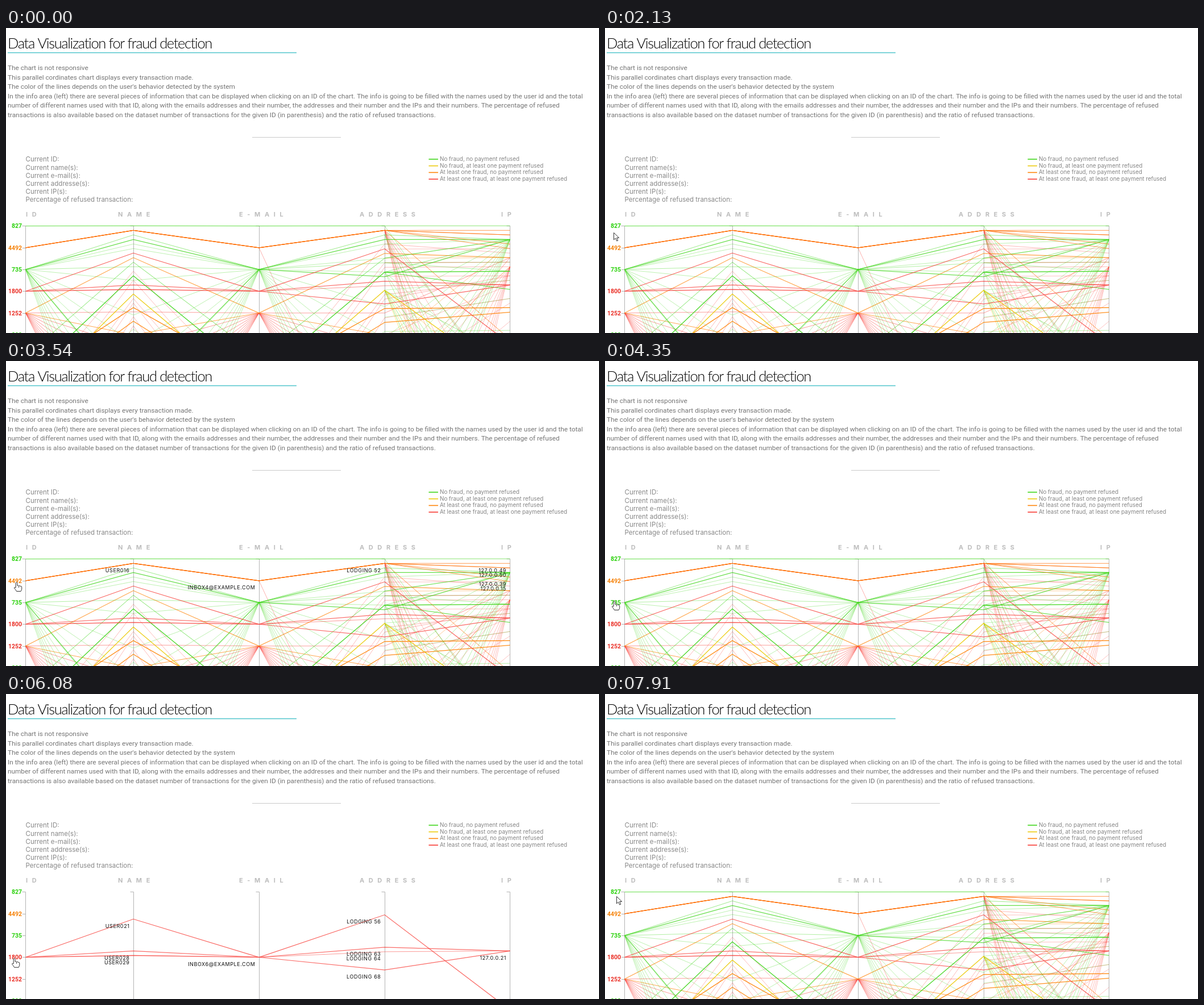
An HTML page with a canvas for the animation above (8000 ms loop, 1043 by 537 pixels).

```html
<!DOCTYPE html>
<html lang="en">
<head>
<meta charset="utf-8">
<title>Data Visualization for fraud detection</title>
<style>
  html, body { margin: 0; width: 100%; height: 100%; overflow: hidden; background: #fff; }
  canvas { display: block; }
</style>
</head>
<body>
<canvas id="stage" width="1043" height="537"></canvas>
<script>
const ctx = document.getElementById('stage').getContext('2d');
const LOOP = 8000;
const AXES = [34.5, 224, 445, 666, 886.5];
const TOP = 348;
const NONE = NaN;
const COLORS = { g: '#40d61c', y: '#eccb0c', o: '#ff8508', r: '#f83a34', d: '#ff6c00' };
const IDS = [['827', 'g'], ['4492', 'o'], ['735', 'g'], ['1800', 'r'], ['1252', 'r'], ['890', 'g']];

const idY = k => TOP + 0.3 + 38.3 * k;
const clamp = v => Math.max(0, Math.min(1, v));
const ramp = (t, a, b) => clamp((t - a) / (b - a));

let seed = 11;
function rand(lo, hi) {
  seed = (seed * 1664525 + 1013904223) % 4294967296;
  return lo + (hi - lo) * seed / 4294967296;
}

// Transactions: one polyline each over the five axes
const lines = [];
function line(id, color, alpha, ys) {
  lines.push({ id, color: COLORS[color], alpha, ys });
}
function path(k, color, alpha, name, address, ip) {
  line(k, color, alpha, [idY(k), name, idY(k), address, ip]);
}
function link(id, color, alpha, address, ip) {
  line(id, color, alpha, [NONE, NONE, NONE, address, ip]);
}
function fan(n, add) {
  for (let i = 0; i < n; i++) add(i);
}

function buildLines() {
  // lower IDs, only partly in view
  const peaks = [[428, 380, 396], [444, 413, 412], [476, 421, 420], [484, 469, 444], [508, 477, 436], [524, 510, 476]];
  peaks.forEach(([name, address, ip], i) => path(8 + i, 'r', 0.34, name, address, ip));
  fan(3, i => link(-1, 'r', 0.3, 389 + 24 * i, 388 + 24 * i));
  fan(3, i => link(-1, 'g', 0.3, 413 + 48 * i, 412 + 32 * i));
  link(-1, 'o', 0.4, 405, 404);
  fan(10, i => link(-1, 'r', 0.32, 356, 640 + 75 * i + rand(0, 40)));
  fan(3, i => link(-1, 'g', 0.32, 364, 640 + 180 * i));
  fan(8, i => link(-1, i % 2 ? 'y' : 'g', 0.45, 461.5, 580 + 65 * i));
  fan(3, i => link(-1, 'g', 0.36, 429.5, 620 + 130 * i));
  fan(9, i => link(-1, 'r', 0.32, 580 + 95 * i + rand(0, 40), 420));
  fan(3, i => link(-1, 'r', 0.3, 540 + 80 * i, 452 + 32 * i));
  fan(2, i => link(-1, 'o', 0.4, 560 + 70 * i, 380 + 40 * i));
  line(-1, 'r', 0.4, [NONE, NONE, idY(1), 865, NONE]);
  path(9, 'g', 0.36, 530, 534, 532);

  // 1252
  path(4, 'r', 0.48, 499.5, 501.5, 404);
  fan(10, i => path(4, 'r', 0.48, 562 + 36 * i, 566 + 38 * i, 700 + 40 * i));
  link(4, 'r', 0.48, 668, 404);
  path(4, 'o', 0.75, 404, 396.5, 404);
  path(4, 'o', 0.7, 540, 541, 560);

  // 735
  fan(10, i => path(2, 'g', 0.34, 505 + 50 * i, 490 + 56 * i, 372));
  path(2, 'g', 0.75, 650, 437.5, 372);
  path(2, 'g', 0.5, 364, 364, 372);
  path(2, 'g', 0.8, 372, 372, 372);
  path(2, 'g', 0.34, 380, 380, 372);
  path(2, 'g', 0.34, 388, 405, 372);
  path(2, 'g', 0.4, 420, 413, 428);
  path(2, 'g', 0.34, 444, 429.5, 460);
  link(2, 'g', 0.7, 429.5, 460);
  link(2, 'g', 0.5, 429.5, 372);

  // heavier traffic of lower IDs
  path(6, 'g', 0.65, 412, 405, 372);
  path(7, 'g', 1, 436, 429.5, 428);
  path(8, 'y', 1, 468, 461.5, 620);
  path(7, 'o', 1, 492, 493.5, 492);
  path(8, 'o', 0.9, 516, 518, 500);

  // 1800
  path(3, 'r', 0.8, 396, 388.5, 556);
  path(3, 'r', 0.75, 452, 445.5, 452);
  path(3, 'r', 0.5, 460, 453.5, 452);
  path(3, 'r', 0.75, 460, 485.5, 452);

  // 4492 and 827
  for (const ip of [356, 364, 364, 380, 388, 548]) path(1, 'd', 0.68, 356, 356, ip);
  path(0, 'g', 0.6, TOP, TOP, TOP);
  path(0, 'g', 0.4, TOP, TOP, 660);
}

// Label of a point on axis 1..4
function caption(axis, y) {
  const i = Math.round((y - TOP) / 8);
  if (axis === 1) return 'USER' + String(15 + i).padStart(3, '0');
  if (axis === 2) return 'INBOX' + (3 + Math.round((y - TOP) / 38.3)) + '@EXAMPLE.COM';
  if (axis === 3) return 'LODGING ' + (51 + i);
  return '127.0.0.' + ([1, 49, 50, 7, 39, 15][i] || 20 + i * 7 % 90);
}

// Pointed-at IDs: index, start, end
const HOVERS = [[0, 2270, 2880], [1, 3520, 4190], [2, 4400, 5280], [3, 5860, 6110], [4, 6330, 6870], [2, 7560, 7640]];

// Pointer tip: time, x, y
const TRACK = [
  [360, 864, 537], [560, 690, 440], [800, 280, 290], [1040, 25, 224], [1110, 36, 217],
  [1180, 36, 217], [1450, 28, 275], [1800, 16, 339], [1900, 16, 339], [2000, 17, 331],
  [2130, 15, 360], [2280, 16, 348], [2480, 17, 346], [2780, 17, 346], [2930, 15, 358],
  [3300, 17, 375], [3540, 18, 389], [3610, 18, 389], [4110, 18, 389], [4350, 16, 422],
  [4610, 16, 423], [5170, 16, 423], [5560, 13, 451], [5860, 14, 460], [6020, 14, 462],
  [6060, 14, 462], [6330, 15, 498], [6550, 15, 501], [6720, 15, 501], [6890, 15, 510],
  [7100, 15, 512], [7310, 15, 512], [7600, 16, 427], [7910, 20, 356]
];

function pointerAt(t) {
  if (t < TRACK[0][0]) return null;
  const n = TRACK.findIndex(p => p[0] > t);
  if (n < 0) return TRACK[TRACK.length - 1].slice(1);
  const [t0, x0, y0] = TRACK[n - 1], [t1, x1, y1] = TRACK[n];
  const u = (t - t0) / (t1 - t0);
  return [x0 + (x1 - x0) * u, y0 + (y1 - y0) * u];
}

function text(str, x, y, font, color, spacing = 0, align = 'left') {
  ctx.font = font;
  ctx.fillStyle = color;
  ctx.letterSpacing = spacing + 'px';
  ctx.textAlign = align;
  ctx.fillText(str, x, y);
}

function stroke(points, color, width = 1) {
  ctx.beginPath();
  for (const [x, y] of points) ctx.lineTo(x, y);
  ctx.strokeStyle = color;
  ctx.lineWidth = width;
  ctx.stroke();
}

const INTRO = [
  'The chart is not responsive',
  'This parallel cordinates chart displays every transaction made.',
  "The color of the lines depends on the user's behavior detected by the system",
  'In the info area (left) there are several pieces of information that can be displayed when clicking on an ID of the chart. The info is going to be filled with the names used by the user id and the total',
  'number of different names used with that ID, along with the emails addresses and their number, the addresses and their number and the IPs and their numbers. The percentage of refused',
  'transactions is also available based on the dataset number of transactions for the given ID (in parenthesis) and the ratio of refused transactions.'
];
const INFO = ['Current ID:', 'Current name(s):', 'Current e-mail(s):', 'Current addresse(s):', 'Current IP(s):', 'Percentage of refused transaction:'];
const LEGEND = [
  ['g', 'No fraud, no payment refused'],
  ['y', 'No fraud, at least one payment refused'],
  ['o', 'At least one fraud, no payment refused'],
  ['r', 'At least one fraud, at least one payment refused']
];
const HEADS = [['ID', 35], ['NAME', 197], ['E-MAIL', 410], ['ADDRESS', 622], ['IP', 871]];

function drawPage() {
  text('Data Visualization for fraud detection', 3, 36, '300 25.5px Lato, sans-serif', '#000', -1.35);
  stroke([[3, 43.5], [511, 43.5]], '#52c5cc', 1.4);
  INTRO.forEach((s, i) => text(s, 3, 74.3 + 16.45 * i, '11.8px Roboto, sans-serif', '#757575'));
  stroke([[433, 192.5], [589, 192.5]], '#cacaca');
  INFO.forEach((s, i) => text(s, 34.5, 235.4 + 14.1 * i, '11.5px Inter, sans-serif', '#888'));
  LEGEND.forEach(([c, s], i) => {
    const y = 231 + 11.7 * i;
    stroke([[743.5, y], [760, y]], COLORS[c], 1.6);
    text(s, 763, y + 3, '9.87px Inter, sans-serif', '#858585');
  });
  HEADS.forEach(([s, x]) => text(s, x, 332, 'bold 11px Inter, sans-serif', '#bdbdbd', 7.6));
}

function drawAxes(tinted) {
  AXES.forEach((x, i) => {
    const color = tinted && i !== 0 && i !== 2 ? '#d3b3b3' : '#b4b4b4';
    const px = Math.floor(x) + 0.5;
    stroke([[px - 6, TOP + 0.5], [px, TOP + 0.5], [px, 540]], color);
  });
  IDS.forEach(([id, c], k) => {
    const y = idY(k);
    stroke([[29, Math.round(y) + 0.5], [34, Math.round(y) + 0.5]], '#b4b4b4');
    text(id, 28, y + 4, 'bold 10.5px Roboto, sans-serif', { g: '#2bd10c', o: '#f5820a', r: '#ea2f26' }[c], 0, 'right');
  });
}

function drawLines(active, others) {
  for (const { id, color, alpha, ys } of lines) {
    const a = alpha * (id === active ? 1 : others);
    if (a < 0.01) continue;
    ctx.globalAlpha = a;
    // NaN ends are skipped by the canvas itself
    stroke(ys.map((y, i) => [AXES[i], y + 0.3]), color, alpha > 0.7 ? 1.2 : 1);
  }
  ctx.globalAlpha = 1;
}

function drawCaptions(id) {
  for (let axis = 1; axis < 5; axis++) {
    const ys = new Set(lines.filter(l => l.id === id).map(l => l.ys[axis]));
    for (const y of ys) {
      if (y < 540) text(caption(axis, y), AXES[axis] - 6.5, y + 15.5, '9px Inter, sans-serif', '#111', 0.6, 'right');
    }
  }
}

const ARROW = new Path2D('M0 0V12.5L3 9.7L5.2 14.6L7.3 13.7L5.2 9H9.2Z');
const HAND = new Path2D('M-1.4 1Q0-1 1.4 1V6Q3 4.8 4 6.4Q5.7 5.5 6.6 7Q9 6.2 9.2 8.8V12Q8.8 14 7.6 16H0Q-1.2 13.2-4 10.4Q-4.2 8-1.4 9.6Z');

function drawPointer(t, hand) {
  const at = pointerAt(t);
  if (!at) return;
  ctx.save();
  ctx.translate(at[0] + 0.5, at[1] + 0.5);
  ctx.fillStyle = '#fff';
  ctx.strokeStyle = '#333';
  ctx.lineWidth = 1;
  const shape = hand ? HAND : ARROW;
  ctx.fill(shape);
  ctx.stroke(shape);
  if (hand) stroke([[4, 7], [4, 9.5]], '#333');
  ctx.restore();
}

function draw(t) {
  ctx.fillStyle = '#fff';
  ctx.fillRect(0, 0, 1043, 537);
  const hover = HOVERS.find(([, a, b]) => t >= a - 60 && t < b + 140);
  let active = -2, others = 1, labels = false, hand = false;
  if (hover) {
    const [id, a, b] = hover;
    active = id;
    others = Math.max(1 - ramp(t, a + 60, a + 150), ramp(t, b + 40, b + 140));
    labels = t >= a && t < b;
    hand = t < b;
  }
  drawPage();
  drawAxes(active === 4 && others < 0.5);
  drawLines(active, others);
  if (labels) drawCaptions(active);
  drawPointer(t, hand);
}

buildLines();
const start = performance.now();
function tick() {
  draw((performance.now() - start) % LOOP);
  requestAnimationFrame(tick);
}
tick();
</script>
</body>
</html>
```
